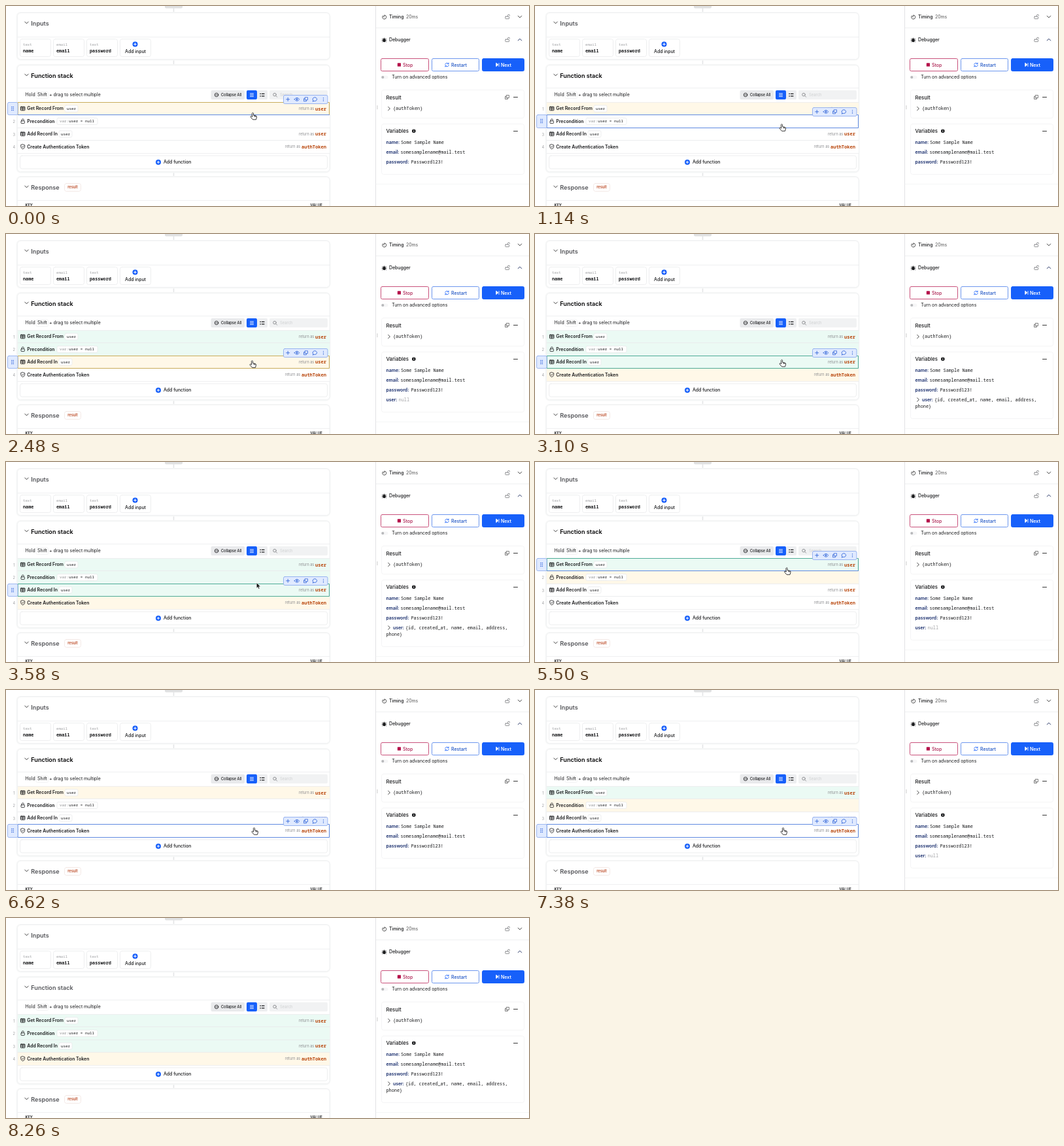
An HTML page for the animation above (8.6 s loop, 800x306 px).

```html
<!DOCTYPE html>
<html lang="en">
<head>
<meta charset="utf-8">
<title>Function stack debugger</title>
<style>
  html, body { margin: 0; width: 100%; height: 100%; overflow: hidden; background: #fff; }
  svg { display: block; width: 100%; height: 100%; }
  text { font-family: Inter, Arial, sans-serif; white-space: pre; }
  .mono { font-family: "Noto Sans Mono", "Liberation Mono", monospace; }
</style>
</head>
<body>
<svg viewBox="0 0 800 306" fill="none" stroke-linecap="round" stroke-linejoin="round">
  <g id="page"></g><g id="rows"></g><g id="vars"></g><g id="pointer"></g>
</svg>
<script>
const LOOP = 8600, ROW_H = 19.5;
const BLUE = '#1760fa', INK = '#18191b', GREY = '#8b8c8f', LINE = '#e9eaeb', FAINT = '#f1f2f3', ORANGE = '#b8450b';
const $ = id => document.getElementById(id);
// row edges sit on whole pixels
const rowTop = i => Math.floor(147 + i * ROW_H) + 0.5;

// y is the vertical centre of the text
const text = (x, y, str, o = {}) => {
  const { size = 6.9, fill = INK, weight = 400, anchor = 'start', mono } = o;
  return `<text x="${x}" y="${y + size * 0.36}" font-size="${size}" fill="${fill}" font-weight="${weight}" text-anchor="${anchor}"${mono ? ' class="mono"' : ''}>${str}</text>`;
};
const code = (x, y, str, o = {}) => text(x, y, str, { mono: true, size: 6.87, ...o });
const title = (y, str, fill = '#55565a') => text(38.3, y, str, { size: 9.1, weight: 600, fill });
const rect = (x, y, w, h, fill = 'none', stroke = 'none', r = 0, sw = 0.8) =>
  `<rect x="${x}" y="${y}" width="${w}" height="${h}" rx="${r}" fill="${fill}" stroke="${stroke}" stroke-width="${sw}"/>`;
const path = (d, stroke = INK, sw = 0.9, fill = 'none') =>
  `<path d="${d}" stroke="${stroke}" stroke-width="${sw}" fill="${fill}"/>`;
const at = (x, y, body) => `<g transform="translate(${x} ${y})">${body}</g>`;
const dot = (x, y, r, fill) => `<circle cx="${x}" cy="${y}" r="${r}" fill="${fill}"/>`;

const chevron = (x, y, turn = 0, color = '#333') =>
  `<g transform="translate(${x} ${y}) rotate(${turn})">${path('M-2.7-1.4L0 1.4L2.7-1.4', color)}</g>`;
const addIcon = (x, y) => dot(x, y, 4, BLUE) + at(x, y, path('M-1.8 0H1.8M0-1.8V1.8', '#fff', 1));
const copyIcon = (x, y, c) => at(x, y, path('M-1-3H3V1H-1ZM-1-1H-3V3H1V1', c, 0.8));
const minus = (x, y) => path(`M${x - 3} ${y}h6`, '#222', 0.9);

const icons = {
  table: rect(-3.2, -2.8, 6.4, 5.6, 'none', INK, 0.6, 0.9) + path('M-3-2H3M-3 .3H3M0-2V2.6', INK, 0.9),
  lock: rect(-2.7, -0.6, 5.4, 3.8, 'none', INK, 0.8, 0.8) + path('M-1.6-.8V-2Q-1.6-3.5 0-3.5T1.6-2V-.8', INK, 0.8),
  shield: path('M0-3.5L3-2.4V0Q2.8 2.5 0 3.6Q-2.8 2.5-3 0V-2.4ZM-1.2 0L-.2 1L1.4-.9', INK, 0.8)
};

const card = (y, h) => rect(16.5, y, 479, h + 1.5, 'none', '#f6f7f7', 6, 2)
  + rect(17.5, y + 0.5, 477.5, h, '#fff', '#eeeff0', 5) + chevron(31.5, y + 15.5);
const rule = (x1, x2, y, color = LINE) => path(`M${x1} ${y}H${x2}`, color, 0.7);
const openLock = y => at(767, y, rect(-3.2, -0.4, 5.8, 3.5, 'none', '#77787b', 0.7) + path('M.4-.5V-1.8Q.4-3.4 2-3.4T3.6-1.8', '#77787b', 0.8));

function field(x, type, name) {
  return rect(x, 50.5, 47, 27, '#fff', LINE, 3)
    + code(x + 4.5, 59, type, { size: 5.7, fill: '#a0a1a4' }) + code(x + 4.5, 68.5, name, { weight: 700 });
}

function drawPage() {
  const label = (x, y, s, o) => text(x, y, s, { weight: 500, ...o });
  let s = rect(243, -4, 27, 7.5, '#e0e1e2', 'none', 2);
  s += path('M256.5 3V10M256.5 83V90M256.5 255V262', '#e4e5e6', 1.6);

  s += card(10, 71) + title(27, 'Inputs') + rule(18, 495, 47.5);
  s += field(21.5, 'text', 'name') + field(72.5, 'email', 'email') + field(123.5, 'text', 'password');
  s += rect(174.5, 50.5, 47, 27, '#fff', LINE, 3) + addIcon(197.5, 58.5) + label(198, 69.7, 'Add input', { anchor: 'middle' });

  s += card(90, 163) + rule(18, 495, 125.5);
  s += text(29.5, 136, 'Hold') + rect(46, 131, 18.5, 10.5, '#fff', '#f0f0f2', 2) + text(48, 136, 'Shift') + text(66, 136, '+ drag to select multiple');
  s += rect(313.5, 129, 51.5, 14, '#e9eaec', 'none', 2) + label(329, 136, 'Collapse All', { size: 5.55 });
  s += at(322, 136, `<circle r="2.8" stroke="${INK}" stroke-width=".8"/>` + path('M-1.3 0H1.3', INK, 0.8));
  s += rect(368, 129, 16, 14, BLUE, 'none', 2) + path('M373.5 134H378.5M373.5 136.2H378.5M373.5 138.4H378.5', '#fff', 0.9);
  s += rect(384, 129, 16, 14, '#edeef0', 'none', 2)
    + path('M388.8 134.4H389.6M391.5 134.4H395M388.8 137.8H389.6M391.5 137.8H395', INK, 1.2);
  s += rect(403, 129, 89, 14, '#f1f2f3', 'none', 2) + text(419, 136, 'Search', { size: 5.9, fill: '#cfd0d2' });
  s += at(411, 135.6, `<circle r="2.3" stroke="#88898d" stroke-width=".9"/>` + path('M1.8 1.8L3.6 3.6', '#88898d'));
  s += rect(21.5, 229, 470, 20, '#fff', LINE, 3) + addIcon(233, 239) + label(241, 239, 'Add function');

  s += card(261, 80) + title(278, 'Response') + rule(18, 495, 297.5);
  s += rect(89.5, 271.5, 25, 12, '#fff', '#f0e4e0', 3) + label(102, 277.3, 'result', { size: 5.8, fill: '#b5380f', anchor: 'middle' });
  s += label(29.5, 305.3, 'KEY', { size: 5.6, weight: 600 }) + label(484, 305.3, 'VALUE', { size: 5.6, weight: 600, anchor: 'end' });

  s += path('M565.5 0V306', '#dedfe1', 0.9) + rule(566, 800, 33.5);
  s += [153, 155, 157].map(y => dot(568, y, 0.55, '#888')).join('');
  s += at(578.5, 17, path('M-2.2-1.8A3 3 0 1 0 .2-3V-1.5M0 0L-1.6-1.5', '#222', 0.8));
  s += label(586, 16.5, 'Timing') + text(612, 16.5, '20ms', { fill: '#555' });
  s += openLock(16.5) + chevron(786, 16.5);
  s += at(578.5, 52, path('M-3-1.7L-1.8-1M3-1.7L1.8-1M-3.3 .5H3.3M-3 2.8L-1.8 1.8M3 2.8L1.8 1.8M-1.2-2.2Q0-4 1.2-2.2', INK, 0.8)
    + '<ellipse cy=".5" rx="2" ry="2.7" fill="#18191b"/>');
  s += label(586, 52, 'Debugger') + openLock(51.5) + chevron(786, 51.5, 180, '#1f2f60');

  const button = (x, w, fill, stroke) => rect(x + 0.5, 80.5, w, 19, fill, stroke, 2, 1);
  s += button(573, 73, '#fff', '#c9527b') + rect(598.8, 87.3, 5.2, 5.2, '#b5134b', 'none', 0.6) + label(607, 90, 'Stop', { size: 7, fill: '#a9184b' });
  s += button(651, 72, '#fff', '#6d97ee') + label(681, 90, 'Restart', { size: 7, fill: '#174fc2' });
  s += at(674.5, 90, path('M-2.8-.6A2.9 2.9 0 0 1 2.4-1.5M2.6-3V-1.3H1M2.8 .6A2.9 2.9 0 0 1-2.4 1.5M-2.6 3V1.3H-1', BLUE, 0.8));
  s += button(728, 64, BLUE, BLUE) + label(757, 90, 'Next', { size: 7, weight: 600, fill: '#fff' });
  s += path('M749.8 87.5V92.5L752.6 90ZM754 87.5V92.5', '#fff', 0.9, '#fff');
  s += rect(573.5, 106.5, 11, 5, '#f6f6f7', 'none', 2.5) + dot(576.3, 109, 2, '#b7b8bb') + text(590.3, 108.7, 'Turn on advanced options');

  s += rect(574.5, 128.5, 218, 43, '#fff', FAINT, 3);
  s += label(581.5, 140, 'Result', { size: 7.8 }) + copyIcon(766.5, 139.5, '#666') + minus(779.5, 139.5);
  s += chevron(586, 157, -90) + code(592, 157, '{authToken}');
  $('page').innerHTML = s;
}

const steps = [
  { icon: 'table', name: 'Get Record From', chip: [90, 20, 'user'], out: 'user' },
  { icon: 'lock', name: 'Precondition', chip: [78, 62, '<tspan fill="#8b8c8f">var:</tspan>user = null'] },
  { icon: 'table', name: 'Add Record In', chip: [81, 20, 'user'], out: 'user' },
  { icon: 'shield', name: 'Create Authentication Token', out: 'authToken' }
];

function toolbar(y) {
  const c = '#3568d8', m = y + 6.3;
  return rect(424.5, y, 67.5, 13, '#e0eaff', '#84a5ee', 2)
    + path(`M428.7 ${m}h5M431.2 ${m - 2.5}v5`, c)
    + at(445, m, path('M-3.7 0Q0-5 3.7 0Q0 5-3.7 0Z', c, 0.9) + dot(0, 0, 1.2, c))
    + copyIcon(458.5, m, c)
    + at(472, m, path('M-2.6 3L-2.2 1.6A3.2 2.9 0 1 1-.7 2.6Z', c, 0.9))
    + [-2.2, 0, 2.2].map(d => dot(485.5, m + d, 0.65, c)).join('');
}

function drawRows(current, hover, inside) {
  let s = title(107, 'Function stack', inside ? '#050506' : undefined);
  steps.forEach((step, i) => {
    const top = rowTop(i), h = rowTop(i + 1) - top, y = 157 + i * 19.4;
    const fill = i < current ? '#ebfaf4' : i === current ? '#fff8e8' : '#fff';
    s += rect(18, top, 477, h, fill) + rule(18, 495, top) + rule(18, 495, top + h);
    s += at(25.7, y, icons[step.icon]) + text(32.3, y, step.name, { weight: 600 });
    if (step.chip) {
      const [x, w, str] = step.chip;
      s += rect(x, y - 5, w, 10, '#fff', LINE, 2) + code(x + (w > 30 ? 4 : 3), y - 0.2, str, { size: 5.9 });
    }
    if (step.out) {
      s += code(490, y, step.out, { size: 7.05, weight: 700, fill: ORANGE, anchor: 'end' })
        + text(488.2 - step.out.length * 4.23, y, 'return as', { size: 5.5, fill: GREY, anchor: 'end' });
    }
    if (i !== hover) s += text(12.3, y + 1, i + 1, { size: 5.6, fill: '#9a9b9e', anchor: 'middle' });
  });
  if (hover >= 0) {
    const top = rowTop(hover), h = rowTop(hover + 1) - top, y = top + 9.5;
    const edge = hover < current ? '#4fab97' : hover === current ? '#c9ad5c' : '#5f8ae0';
    s += rect(18.5, top, 476, h, 'none', edge, 0, 1);
    if (!hover) s += path(`M18.5 ${top + h}H494.5`, '#5f8ae0', 1);
    s += rect(2.5, top, 15.5, h, '#e0eaff', '#8aa9ee', 2);
    for (let k = 0; k < 6; k++) s += dot(8.8 + k % 2 * 2.4, y - 2.4 + (k >> 1) * 2.4, 0.75, '#2d63dc');
    s += toolbar(top - 11);
  }
  $('rows').innerHTML = s;
}

function drawVars(current) {
  const bottom = [257, 272, 272, 282][current] + 0.5;
  const key = (x, y, name) => text(x, y, name + ':', { weight: 600, fill: '#14296a' });
  let s = rect(574.5, 180.5, 218, bottom - 180.5, '#fff', FAINT, 3) + rule(566, 800, bottom + 15, FAINT);
  s += text(581.5, 191.5, 'Variables', { size: 7.8, weight: 500 }) + minus(779.5, 191.5)
    + dot(623.8, 191.3, 2.8, INK) + path('M623.8 191V192.7M623.8 189.7V189.8', '#fff', 0.8);
  s += key(581.5, 209, 'name') + code(604, 209, 'Some Sample Name');
  s += key(581.5, 224, 'email') + code(603.5, 224, 'somesamplename@mail.test');
  s += key(581.5, 239, 'password') + code(619.5, 239, 'Password123!');
  if (current === 3) {
    s += chevron(586, 253.5, -90) + key(592, 253.5, 'user')
      + code(611, 253.5, '{id, created_at, name, email, address,') + code(581.5, 263.5, 'phone}');
  } else if (current) {
    s += key(581.5, 253.5, 'user') + code(600.6, 253.5, 'null', { fill: '#a0a1a4' });
  }
  $('vars').innerHTML = s;
}

// [time, active step]
const stepTimes = [[0, 0], [1300, 1], [2480, 2], [2940, 3], [3940, 0], [5000, 1], [5880, 0], [6780, 1], [7400, 2], [7900, 3]];
// [time, x, y] of the pointer tip
const track = [[0, 377.5, 163], [600, 377.5, 163], [1140, 377.5, 180.5], [1720, 377.5, 180.5], [2100, 376.5, 193.5],
  [2940, 376.5, 193.5], [3580, 383.3, 185], [4320, 383.3, 185], [4680, 385, 161.5], [5880, 385, 161.5],
  [6620, 379.5, 210.5], [7900, 379.5, 210.5], [8240, 812, 195], [LOOP, 812, 195]];

function pointerAt(t) {
  const i = track.findIndex(k => k[0] > t);
  const [t0, x0, y0] = track[i - 1], [t1, x1, y1] = track[i];
  const p = (t - t0) / (t1 - t0), e = p * p * (3 - 2 * p);
  return [x0 + (x1 - x0) * e, y0 + (y1 - y0) * e];
}

const hand = path('M-1 1Q0-1 1 1V4.2L4.6 4.9Q6.4 5.4 6 7.2L5 10.8H0L-3.4 6.8Q-3.6 5.2-2 5.6L-1 6.4ZM2.7 5V6.4M4.4 5.4V6.6', '#222', 0.9, '#fff');
const arrow = path('M0 0V8L1.9 6.3L3.2 9.2L4.6 8.6L3.3 5.8H5.8Z', '#fff', 0.5, '#111');
let lastState = '', lastShape;

function frame() {
  const t = performance.now() % LOOP;
  const [x, y] = pointerAt(t);
  const current = stepTimes.filter(k => k[0] <= t).pop()[1];
  const inside = x < 496;
  const hover = inside ? Math.floor((y - 146) / ROW_H) : -1;
  const state = [current, hover, inside].join();
  if (state !== lastState) {
    drawRows(current, hover, inside);
    drawVars(current);
    lastState = state;
  }
  const shape = !inside || (t > 3480 && t < 4400) ? arrow : hand;
  if (shape !== lastShape) $('pointer').innerHTML = lastShape = shape;
  $('pointer').setAttribute('transform', `translate(${x} ${y})`);
  requestAnimationFrame(frame);
}

drawPage();
frame();
</script>
</body>
</html>
```
